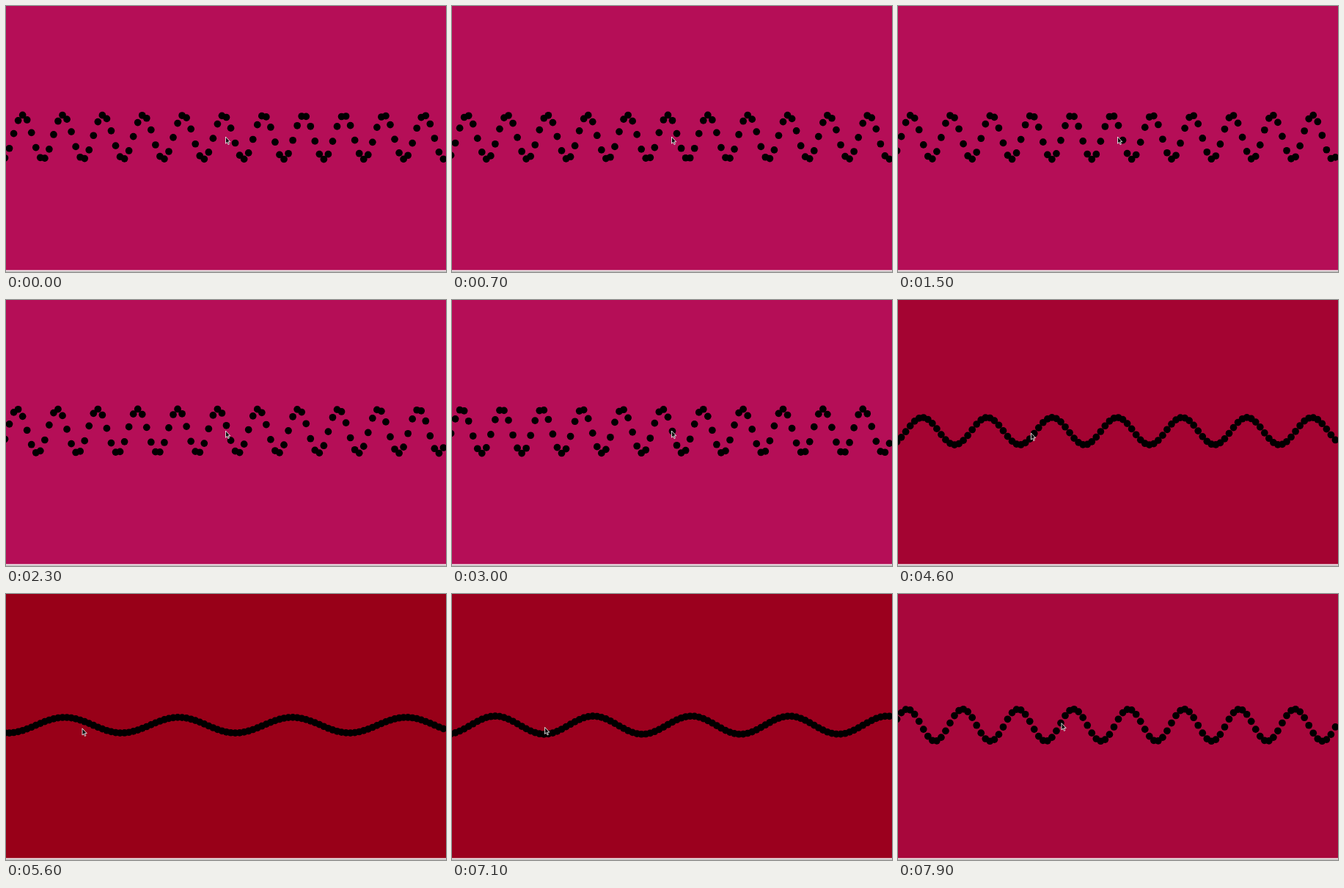
These frames come from a looping animation (600x362 px, 8 s). An HTML page:

```html
<!DOCTYPE html>
<html lang="en">
<head>
<meta charset="utf-8">
<title>Sine dots</title>
<style>
  html, body { margin: 0; width: 100%; height: 100%; overflow: hidden; }
  svg { display: block; width: 100%; height: 100%; }
</style>
</head>
<body>
<svg viewBox="0 0 600 362">
  <rect id="back" width="600" height="362"/>
  <g id="dots"></g>
  <rect y="359.4" width="600" height="1.6" fill="#efe9ea"/>
  <rect y="361" width="600" height="1" fill="#b8b2b3"/>
  <path id="cursor" d="M0 0V9.2L2.1 7.4 3.5 10.6 4.9 10 3.5 6.8H6.3Z" fill="#111" stroke="#fff" stroke-width=".8"/>
</svg>
<script>
const LOOP = 8000, STEP = 100;
const COUNT = 100, SPACING = 6.04, FIRST_X = -1.5, MID_Y = 178.5, RADIUS = 4.85;

const back = document.getElementById('back');
const cursor = document.getElementById('cursor');
const dots = Array.from({ length: COUNT }, (_, i) => {
  const dot = document.createElementNS('http://www.w3.org/2000/svg', 'circle');
  const x = FIRST_X + i * SPACING;
  dot.setAttribute('cx', x);
  dot.setAttribute('r', RADIUS);
  document.getElementById('dots').append(dot);
  return { dot, x };
});

// The pointer rests, slows down towards the left, waits, then speeds up to the right
const ease = u => Math.max(0, u) ** 1.4;
function pointer(t) {
  const left = ease(1 - Math.max(0, t - 3600) / 2231);
  const right = ease((t - 6706) / 1194);
  return { x: 97 + 202 * left + 119.8 * right, y: 183 - 5 * left - 7 * right };
}

function backColour(m) {
  const r = 152 + (m - 105) * 0.147;
  const g = Math.max(0, (m - 142) * 0.09);
  const b = 24 + (m - 105) * 0.325;
  return `rgb(${[r, g, b].map(Math.round)})`;
}

function draw(time) {
  const t = Math.floor(time % LOOP / STEP) * STEP;
  const m = pointer(t).x;
  const amplitude = m * 0.1005;
  const waveNumber = 2 * Math.PI * m / 16367;
  const origin = -18.2 - t / STEP * 0.325;

  back.setAttribute('fill', backColour(m));
  for (const { dot, x } of dots) {
    dot.setAttribute('cy', MID_Y + amplitude * Math.sin(waveNumber * (x - origin)));
  }
  // The wave trails the visible cursor slightly
  const tip = pointer(t + 40);
  cursor.setAttribute('transform', `translate(${tip.x + 0.5} ${tip.y})`);
}

const start = performance.now();
function tick() {
  draw(performance.now() - start);
  requestAnimationFrame(tick);
}
tick();
</script>
</body>
</html>
```
